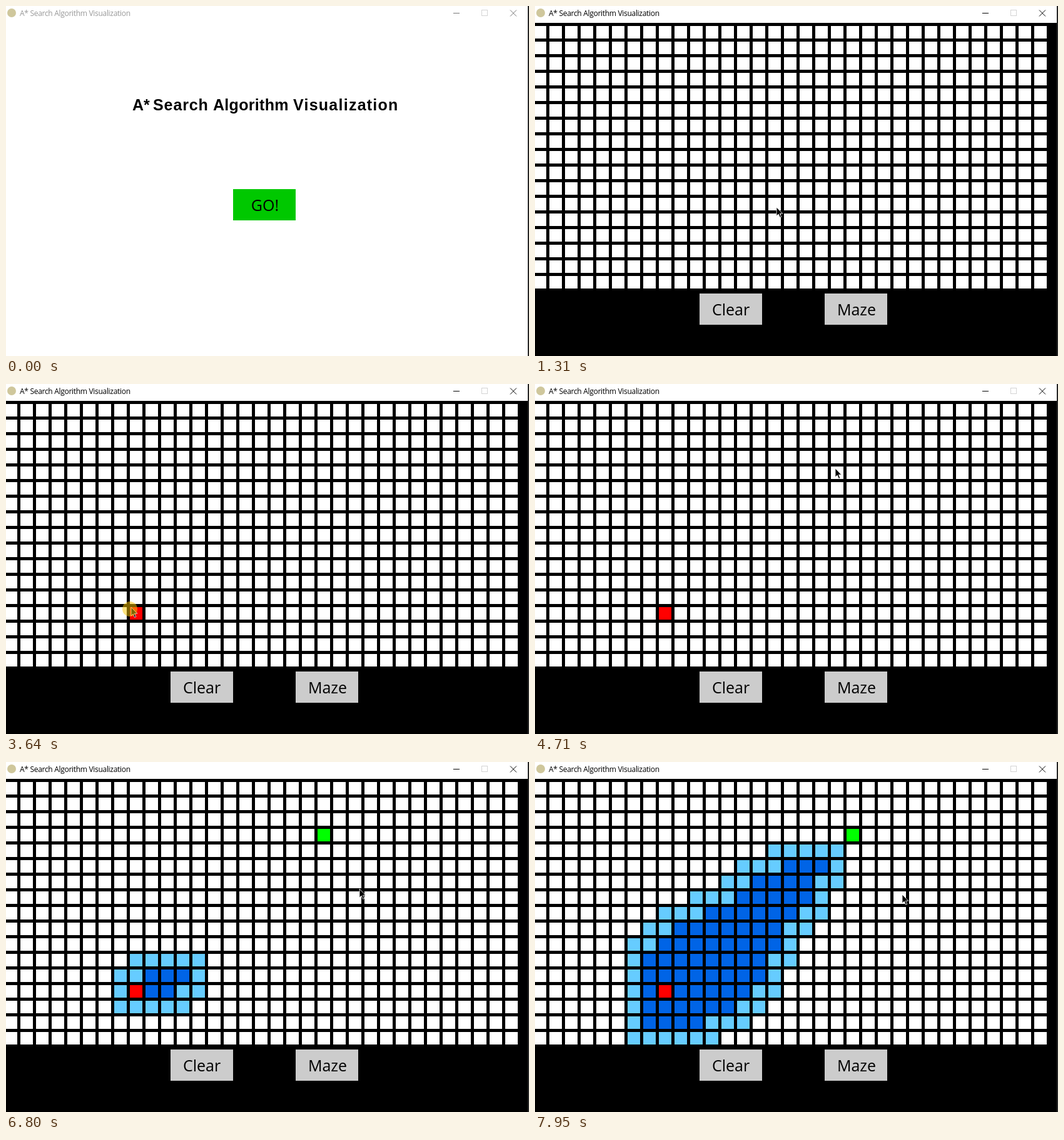
An HTML page for the animation above (8 s loop, 836x560 px).

```html
<!DOCTYPE html>
<html lang="en">
<head>
<meta charset="utf-8">
<title>A* Search Algorithm Visualization</title>
<style>
  html, body { margin: 0; width: 100%; height: 100%; overflow: hidden; background: #fff; }
  svg { display: block; width: 836px; height: 560px; }
  .bar { font: 12px "Open Sans", "Noto Sans", sans-serif; letter-spacing: -.3px; }
  .head { font: bold 25px "Liberation Sans", Arial, sans-serif; }
  .btn { font: 25px "Open Sans", "Noto Sans", sans-serif; text-anchor: middle; }
</style>
</head>
<body>
<svg viewBox="0 0 836 560">
  <rect width="836" height="560" fill="#fff"/>

  <g id="intro">
    <g class="head">
      <text x="202" y="167">A*</text>
      <text x="235" y="167" letter-spacing=".9">Search</text>
      <text x="331" y="167" letter-spacing=".3">Algorithm</text>
      <text x="459" y="167" letter-spacing="1.25">Visualization</text>
    </g>
    <rect id="go" x="363" y="293" width="100" height="50"/>
    <text class="btn" x="414" y="328" font-style="italic">GO!</text>
  </g>

  <g id="board">
    <rect y="27" width="836" height="533"/>
    <path id="grid" fill="#fff"/>
    <path id="open" fill="#66ccff"/>
    <path id="closed" fill="#0064e6"/>
    <path id="start" fill="#f00"/>
    <path id="goal" fill="#0f0"/>
    <path d="M263 460h100v50h-100zM463 460h100v50h-100z" fill="#ccc"/>
    <text class="btn" x="313" y="495">Clear</text>
    <text class="btn" x="514" y="495">Maze</text>
  </g>

  <circle cx="9" cy="11" r="7" fill="#cfc79c"/>
  <text id="caption" class="bar" x="22" y="16">A* Search Algorithm Visualization</text>
  <g fill="none">
    <path id="controls" d="M715 11.5h10M806 6.5l10 10M816 6.5l-10 10"/>
    <rect x="760.5" y="6.5" width="9" height="9" stroke="#d4d4d4"/>
  </g>
  <rect x="834" width="2" height="560" fill="#262626"/>

  <path id="cursor" d="M0 0V14L3.2 11L5.6 16.4L7.8 15.4L5.5 10.2H9.8Z" stroke="#fff" stroke-width=".8"/>
  <circle id="click" r="12" fill="#ffc800" opacity=".5"/>
</svg>
<script>
const LOOP = 8000, COLS = 33, ROWS = 17;
const START = [8, 13], GOAL = [20, 3];
const $ = id => document.getElementById(id);
const show = (id, on) => $(id).setAttribute('visibility', on ? 'visible' : 'hidden');
const cellPath = cells => cells.map(([c, r]) => `M${c * 25 - 2} ${r * 25 + 32}h20v20h-20z`).join('');

// Growth of the explored area: first row, then the column span of each row
const stages = [
  [12, [[9, 11], [8, 10]]],
  [7, [[14, 14], [13, 15], [11, 14], [9, 14], [8, 13], [7, 13], [7, 12], [7, 11], [8, 9]]],
  [5, [[16, 18], [14, 17], [13, 17], [11, 16], [9, 15], [8, 15], [7, 14], [7, 14], [7, 13], [7, 12], [7, 10]]]
];
const dist = (a, b) => Math.hypot(a[0] - b[0], a[1] - b[1]);
const score = cell => 1.5 * dist(cell, START) + dist(cell, GOAL);

const order = [], counts = [], seen = new Set();
for (const [top, spans] of stages) {
  const added = [];
  spans.forEach(([from, to], i) => {
    for (let c = from; c <= to; c++) {
      const key = c + ',' + (top + i);
      if (!seen.has(key)) added.push([c, top + i]);
      seen.add(key);
    }
  });
  order.push(...added.sort((a, b) => score(a) - score(b)));
  counts.push(order.length);
}

// Search progress: time, cells explored, redraws until the next entry
const search = [[6720, 1, 1], [6800, counts[0], 8], [7430, counts[1], 7], [7950, counts[2], 1]];
function explored(t) {
  if (t < search[0][0]) return 0;
  for (let i = 1; i < search.length; i++) {
    const [t0, n0, steps] = search[i - 1], [t1, n1] = search[i];
    if (t < t1) return Math.round(n0 + (n1 - n0) * Math.floor((t - t0) / (t1 - t0) * steps) / steps);
  }
  return order.length;
}

function neighbours(cells) {
  const found = new Map();
  for (const [c, r] of cells)
    for (let y = Math.max(0, r - 1); y <= Math.min(ROWS - 1, r + 1); y++)
      for (let x = c - 1; x <= c + 1; x++) found.set(x + y * COLS, [x, y]);
  return [...found.values()];
}

const smooth = u => u * u * (3 - 2 * u);
const out = u => 1 - (1 - u) ** 2;
const linear = u => u;
const jump = u => u < 1 ? 0 : 1;

// Pointer: time, x, y, easing into this point
const moves = [
  [220, 735, 548], [930, 386, 322, out], [1720, 386, 322, jump],
  [2170, 208, 331, smooth], [2550, 187, 344, out], [2630, 185, 347, linear],
  [2780, 200, 344, jump], [3030, 200, 344, jump], [3260, 200, 357, smooth],
  [3720, 200, 357, jump], [4560, 471, 142, smooth], [4710, 480, 135, linear],
  [5250, 511, 120, out], [5650, 511, 120, jump], [6420, 545, 188, smooth],
  [6800, 565, 203, linear], [7260, 584, 211, out], [7950, 587, 212, linear]
];
function pointer(t) {
  for (let i = 1; i < moves.length; i++) {
    const [t0, x0, y0] = moves[i - 1], [t1, x1, y1, ease] = moves[i];
    if (t < t1) {
      const u = ease(Math.max(0, (t - t0) / (t1 - t0)));
      return [Math.round(x0 + (x1 - x0) * u), Math.round(y0 + (y1 - y0) * u)];
    }
  }
  return moves[moves.length - 1].slice(1, 3);
}

const clicks = [[1240, 1310, 385, 322], [3640, 3790, 198, 360], [5650, 5730, 511, 120]];

const cells = Array.from({ length: COLS * ROWS }, (_, i) => [i % COLS, Math.floor(i / COLS)]);
$('grid').setAttribute('d', cellPath(cells));
$('start').setAttribute('d', cellPath([START]));
$('goal').setAttribute('d', cellPath([GOAL]));

let drawn = -1;
function drawSearch(n) {
  if (n === drawn) return;
  drawn = n;
  const closed = order.slice(0, n);
  $('closed').setAttribute('d', cellPath(closed));
  $('open').setAttribute('d', cellPath(neighbours(closed)));
}

function render(t) {
  const active = t >= 1240, playing = t >= 1310;
  const [x, y] = pointer(t);
  const hover = x >= 363 && x < 463 && y >= 293 && y < 343;

  show('intro', !playing);
  $('board').setAttribute('display', playing ? 'inline' : 'none');
  $('go').setAttribute('fill', hover ? '#00ff00' : '#00c800');
  $('caption').setAttribute('fill', active ? '#000' : '#999');
  $('controls').setAttribute('stroke', active ? '#000' : '#777');

  show('start', t >= 3640);
  show('goal', t >= 5650);
  drawSearch(explored(t));

  show('cursor', t >= 220);
  $('cursor').setAttribute('transform', `translate(${x} ${y})`);
  const click = clicks.find(([from, to]) => t >= from && t < to);
  show('click', click);
  if (click) {
    $('click').setAttribute('cx', click[2]);
    $('click').setAttribute('cy', click[3]);
  }
}

const began = performance.now();
function tick() {
  render((performance.now() - began) % LOOP);
  requestAnimationFrame(tick);
}
tick();
</script>
</body>
</html>
```
